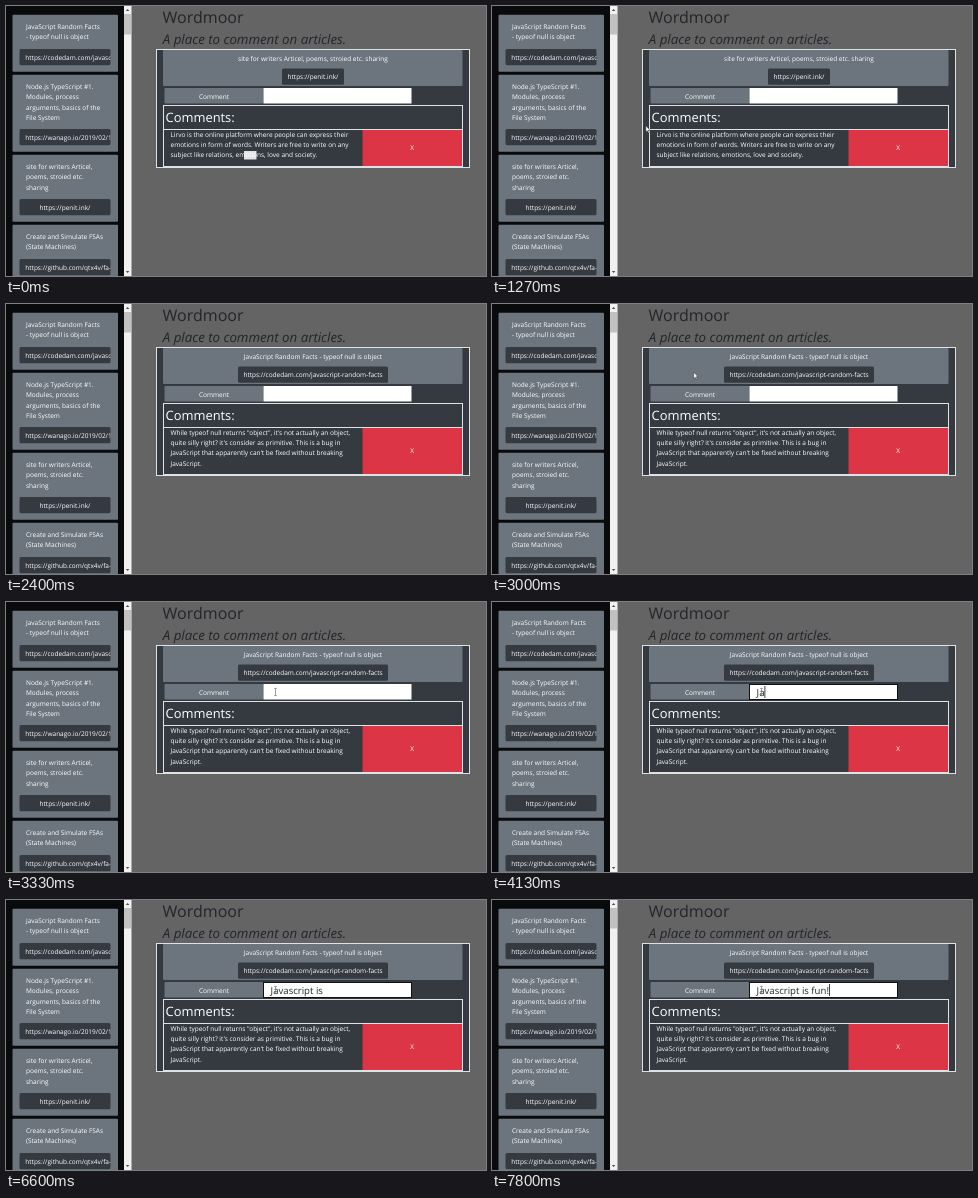
These frames come from a looping animation (480 by 270 pixels, 8000 ms). An HTML page:

```html
<!DOCTYPE html>
<html>
<head>
<meta charset="utf-8">
<style>
  html, body { margin: 0; width: 100%; height: 100%; overflow: hidden; background: #646464; }
  svg { display: block; }
  text { font: 6.5px "Open Sans", "Noto Sans", sans-serif; fill: #fff; white-space: pre; text-rendering: geometricPrecision; }
  .mid { text-anchor: middle; }
  .h1 { font-size: 16px; fill: #22252a; }
  .h2 { font-size: 13.3px; font-style: italic; fill: #22252a; }
  .h3 { font-size: 12.9px; }
  #typed { font-size: 9.6px; fill: #22262a; }
  .line { fill: none; stroke: #dfe2e5; stroke-width: 1; }
</style>
</head>
<body>
<svg id="stage" width="480" height="270" viewBox="0 0 480 270"></svg>
<script>
const LOOP = 8000, GREY = '#6c757d', DARK = '#343a40', RED = '#dc3545';

const rect = (x, y, w, h, fill, r = 0) =>
  `<rect x="${x}" y="${y}" width="${w}" height="${h}" rx="${r}" fill="${fill}"/>`;
const frame = (x, y, w, h) =>
  `<rect class="line" x="${x}" y="${y}" width="${w}" height="${h}"/>`;
const text = (x, y, s, cls = '') => `<text x="${x}" y="${y}" class="${cls}">${s}</text>`;

const cards = [
  [['JavaScript Random Facts', '- typeof null is object'], 'https://codedam.com/javascript-random-facts'],
  [['Node.js TypeScript #1.', 'Modules, process', 'arguments, basics of the', 'File System'], 'https://wanago.io/2019/02/11/node-js'],
  [['site for writers Articel,', 'poems, stroied etc.', 'sharing'], 'https://penit.ink/'],
  [['Create and Simulate FSAs', '(State Machines)'], 'https://github.com/qtx4v/fa-simulator']
];

function sidebar() {
  let y = 8.7, out = rect(0, 0, 118, 270, '#090a0c');
  for (const [lines, url] of cards) {
    const n = lines.length, top = y + 14.3 + 10 * n;
    out += rect(6.5, y, 105.5, 37 + 10 * n, GREY, 1);
    lines.forEach((s, i) => out += text(20, y + 14.6 + i * 10.1, s));
    out += rect(13.5, top, 91, 16.2, DARK, 1.5);
    out += `<svg x="13.5" y="${top}" width="91" height="16" overflow="hidden">` +
      (url.length < 20 ? text(45.5, 10.5, url, 'mid') : text(5.8, 10.5, url)) + '</svg>';
    y += 40 + 10 * n;
  }
  return out + rect(118, 0, 7.5, 270, '#f1f1f1') + rect(118, 8, 7, 20.5, '#c1c1c1') +
    '<path d="M119.8 5l1.8-2 1.8 2zM119.8 265l1.8 2 1.8-2z" fill="#505050"/>';
}

function panel(id, title, url, urlWidth, lines, bottom) {
  return `<g id="${id}">` + rect(150.5, 43.5, 313, bottom - 43.5, DARK) +
    frame(150.5, 43.5, 313, bottom - 43.5) +
    rect(157, 44, 299.5, 36, GREY, 1) + text(307, 55.3, title, 'mid') +
    rect(307 - urlWidth / 2, 62.5, urlWidth, 16.3, DARK, 1.5) + text(307, 73.2, url, 'mid') +
    rect(158.5, 82, 99, 15.5, GREY, 1) + text(208, 92.7, 'Comment', 'mid') +
    rect(257.5, 82, 148, 15.5, '#fff') +
    frame(157.5, 99.5, 299, bottom - 100.5) +
    text(159.5, 115.6, 'Comments:', 'h3') +
    frame(157.5, 123.5, 299, bottom - 124.5) +
    rect(356.5, 124, 99.5, bottom - 125.5, RED) +
    text(406.2, (bottom + 122.8) / 2 + 2, 'X', 'mid') +
    lines.map((s, i) => text(164.5, 130.8 + i * 10.3, s)).join('') + '</g>';
}

stage.innerHTML = rect(0, 0, 480, 270, '#646464') +
  text(156.6, 17.4, 'Wordmoor', 'h1') +
  text(156.8, 38.2, 'A place to comment on articles.', 'h2') +
  sidebar() +
  panel('poems', 'site for writers Articel, poems, stroied etc. sharing', 'https://penit.ink/', 62, [
    'Lirvo is the online platform where people can express their',
    'emotions in form of words. Writers are free to write on any',
    'subject like relations, emotions, love and society.'], 161.5) +
  panel('facts', 'JavaScript Random Facts - typeof null is object', cards[0][1], 150, [
    'While typeof null returns "object", it\'s not actually an object,',
    'quite silly right? it\'s consider as primitive. This is a bug in',
    'JavaScript that apparently can\'t be fixed without breaking',
    'JavaScript.'], 171.5) +
  '<rect id="focus" x="257.5" y="82.5" width="148" height="15" fill="none" stroke="#101010"/>' +
  '<text id="typed" x="264.6" y="93.6"></text>' +
  '<rect id="caret" y="84" width=".8" height="12" fill="#111"/>' +
  '<rect id="glow" x="238" y="145" width="12.5" height="8.5" fill="#fff" opacity=".86"/>' +
  '<path id="arrow" d="M0 0v6.2l1.5-1.3 1 2.2 1-.5-1-2.1h1.9z" fill="#fff" stroke="#111" stroke-width=".4"/>' +
  '<path id="beam" d="M-1.4-3.6h2.8M0-3.6v7.2M-1.4 3.6h2.8" stroke="#666" stroke-width=".6"/>';

// Pointer path: time, x, y
const path = [
  [870, 236, 146], [1070, 160, 121], [1270, 154, 120], [1600, 95, 70],
  [1800, 92, 67], [2000, 74, 32], [2470, 74, 32],
  [2800, 151, 52], [3270, 269.5, 90], [LOOP, 269.5, 90]
];
const phrase = 'Javascript is fun!';
const keys = [3930, 4130, 4330, 4470, 4730, 5000, 5400, 5530, 5930,
  6070, 6130, 6330, 6470, 6730, 6870, 7130, 7270, 7800];

const $ = id => document.getElementById(id);
const show = (id, on) => $(id).setAttribute('visibility', on ? 'visible' : 'hidden');
const within = (t, a, b) => t >= a && t < b;

function pointer(t) {
  const i = Math.max(1, path.findIndex(p => p[0] > t));
  const [a, b] = [path[i - 1], path[i]];
  const k = (t - a[0]) / (b[0] - a[0]);
  return [1, 2].map(j => a[j] + (b[j] - a[j]) * k);
}

function draw(t) {
  show('poems', t < 2400);
  show('facts', t >= 2400);
  show('glow', t < 730);
  show('focus', t >= 3530);

  const [x, y] = pointer(t);
  const seen = within(t, 870, 2470) || t >= 2800;
  const overText = within(t, 2000, 2470) || t >= 3270;
  show('arrow', seen && !overText);
  show('beam', seen && overText);
  for (const id of ['arrow', 'beam']) $(id).setAttribute('transform', `translate(${x} ${y})`);

  const typed = $('typed');
  typed.textContent = phrase.slice(0, keys.filter(k => k <= t).length);
  $('caret').setAttribute('x', 264.6 + typed.getComputedTextLength());
  show('caret', t >= 3530 && !within(t, 6600, 6730) && !within(t, 7600, 7800));
}

const start = performance.now();
function tick() {
  draw((performance.now() - start) % LOOP);
  requestAnimationFrame(tick);
}
tick();
</script>
</body>
</html>
```
